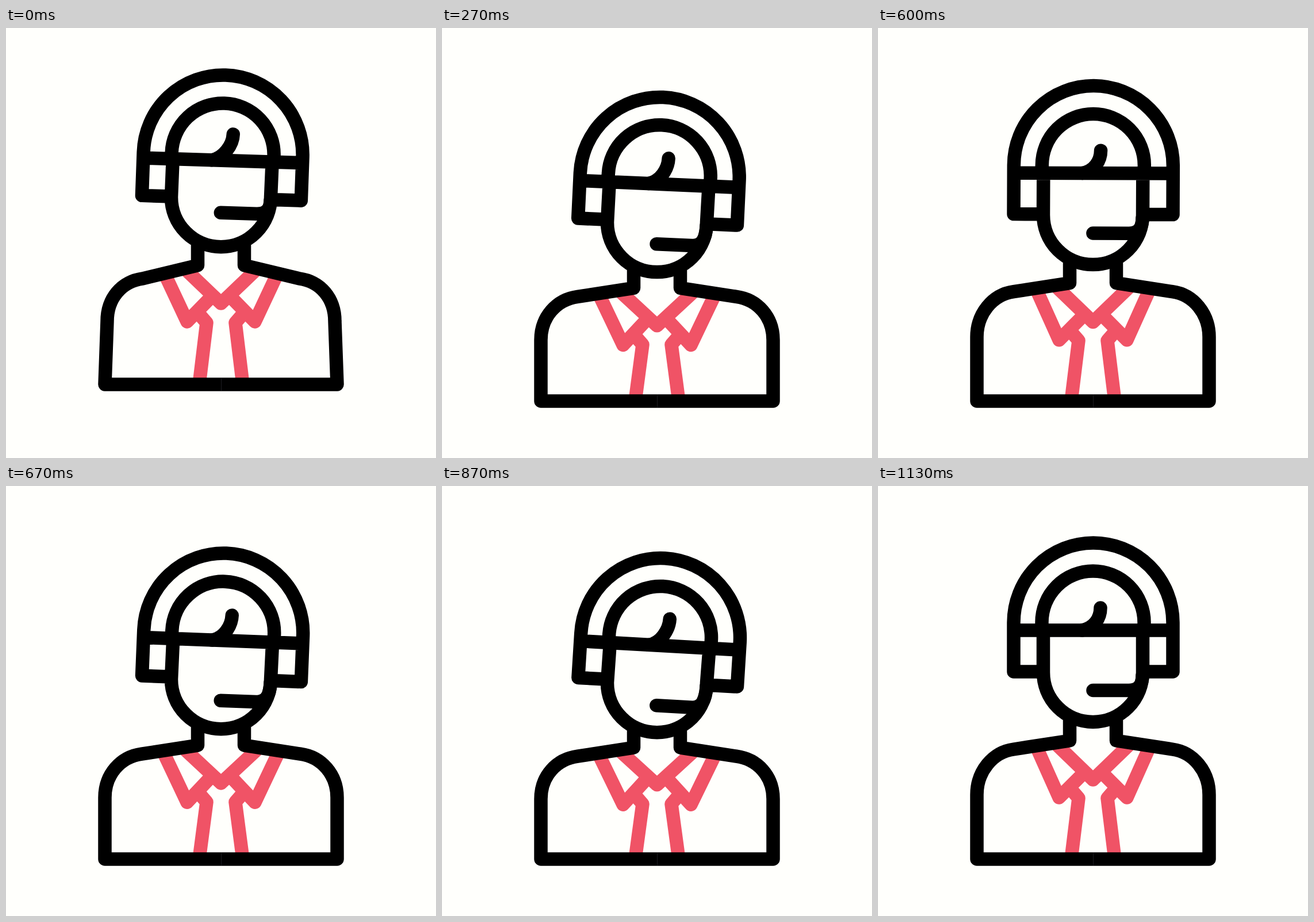
An HTML page for the animation above (1190 ms loop, 748x748 px).

```html
<!DOCTYPE html>
<html lang="en">
<head>
<meta charset="utf-8">
<title>Support agent</title>
<style>
  html, body { margin: 0; height: 100%; overflow: hidden; background: #fffffc; }
  svg { display: block; width: 100vw; height: 100vh; }
  path { fill: none; stroke: #000; stroke-width: 23.5; stroke-linejoin: round; }
  #shirt { stroke: #f05366; }
  #hair, #mic { stroke-linecap: round; }
  #seam { stroke: #1c1c22; stroke-width: 1; }
</style>
</head>
<body>
<svg viewBox="0 0 748 748">
  <path id="shirt"/>
  <path id="body"/>
  <path id="seam"/>
  <path id="head"/>
  <path id="hair"/>
  <path id="mic"/>
</svg>
<script>
const LOOP = 1190, STEP = 200 / 3, CX = 374, PIVOT = 335;
const clamp = v => Math.min(1, Math.max(0, v));
const ease = (t, from, to) => (1 - Math.cos(Math.PI * clamp((t - from) / (to - from)))) / 2;
const set = (id, d) => document.getElementById(id).setAttribute("d", d);

// How far the head nods: two bobs per loop
function nodAt(t) {
  if (t < 139) return 0.38 + 0.62 * Math.sin(Math.PI / 2 * clamp(t / 130));
  if (t < 570) return 1 - ease(t, 139, 401);
  return ease(t, 575, 770) * (1 - ease(t, 770, 1020));
}

function draw(t) {
  const nod = nodAt(t), lift = clamp(1 - t / 125);
  const angle = 4.8 * Math.PI / 180 * nod, cos = Math.cos(angle), sin = Math.sin(angle);

  // Offset of a part: sinks with the nod, rises with the jump
  const part = (sink, rise) => sink * nod - rise * lift;
  const at = (x, y) => x.toFixed(2) + "," + y.toFixed(2) + " ";
  const tilted = dy => (x, y) => {
    const u = x - CX, v = y - PIVOT;
    return at(CX + u * cos - v * sin, PIVOT + u * sin + v * cos + dy);
  };
  const dome = tilted(part(39, 32)), brow = tilted(part(39, 35.5));
  const ear = tilted(part(27, 37.5)), mic = tilted(part(39, 49)), tuft = tilted(part(27, 38));
  const jaw = part(27, 40), neck = part(18, 37), shoulder = part(18, 29), arm = part(11, 31);
  const floor = 649 - 29 * lift;

  set("head",
    "M" + ear(287, 323) + "L" + ear(236, 323) + "L" + dome(236, 237.5) +
    "A138.5 138.5 0 0 1 " + dome(513, 237.5) + "L" + ear(513, 323) + "L" + ear(462, 323) +
    "M" + brow(236, 251) + "L" + brow(513, 251) +
    "M" + brow(285, 251) + "L" + dome(285, 237) +
    "A89 89 0 0 1 " + dome(463, 237) + "L" + brow(463, 251) +
    "M" + brow(287.5, 251) + "L" + at(287.5, 324 + jaw) +
    "A86.5 86.5 0 0 0 " + at(460.5, 324 + jaw) + "L" + brow(460.5, 251));

  const sway = 3.5 * nod + 3 * lift;
  set("hair", "M" + tuft(387 + sway, 212) + "C" + tuft(387 + sway, 230) + brow(376, 247) + brow(355, 251));
  set("mic", "M" + mic(374, 355.5) + "L" + mic(436, 355.5) + "Q" + mic(460, 355.5) + at(460, 330 + jaw));

  // One side of the torso; m = -1 left, 1 right
  const side = m => {
    const p = (x, y) => at(CX + m * x, y);
    return "M" + p(40.5, 405 + jaw) + "L" + p(40.5, 443 + neck) + "L" + p(138 - 2 * lift, 458 + shoulder) +
      "C" + p(175 - 2 * lift, 463 + shoulder) + p(202 - 4 * lift, 497 + arm) + p(202 - 4 * lift, 537 + arm) +
      "L" + p(202, floor) + "L" + p(0, floor);
  };
  set("body", side(-1) + side(1));
  set("seam", `M374.5 ${floor - 11}v22`);

  const collar = part(18, 38), apex = part(13, 37), knot = part(15, 36);
  const lapel = m => {
    const p = (x, y) => at(CX + m * x, y);
    return "M" + p(97 + 5 * nod, 457 + collar) + "L" + p(59, 542 + collar) + "L" + p(22, 505 + apex) +
      "M" + p(38, floor) + "L" + p(25, 543 + knot) + "L" + p(38, 528 + knot);
  };
  set("shirt", lapel(-1) + lapel(1) +
    "M" + at(312, 451 + collar) + "L" + at(CX, 511 + apex) + "L" + at(436, 451 + collar));
}

// The motion advances at 15 pictures per second
function tick(now) {
  draw(Math.floor((now % LOOP + 3.4) / STEP) % 18 * STEP);
  requestAnimationFrame(tick);
}
draw(0);
requestAnimationFrame(tick);
</script>
</body>
</html>
```
